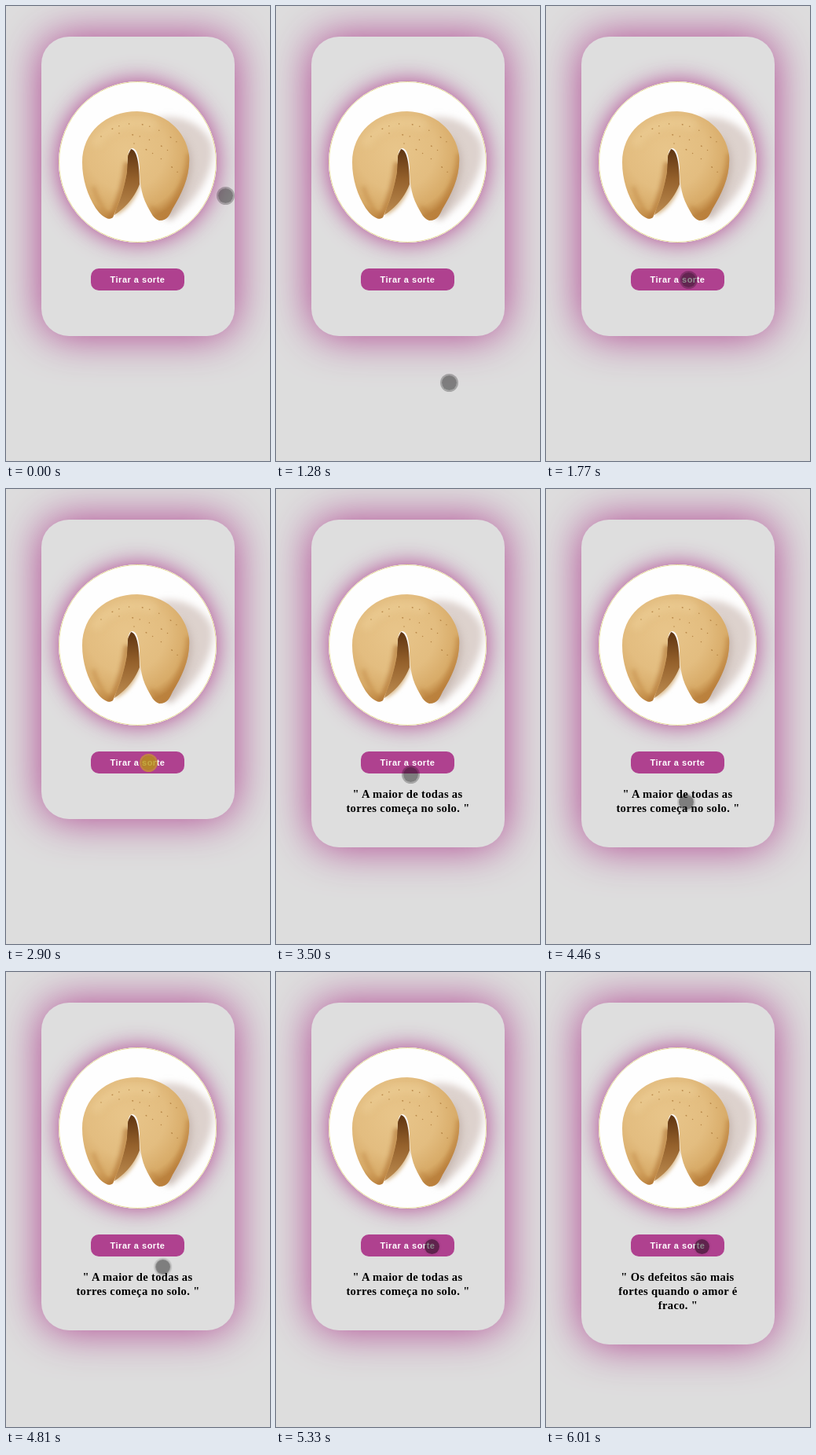
Write an HTML page that moves like this. It is 336x579 px and loops after 8000 ms.

```html
<!DOCTYPE html>
<html lang="pt">
<head>
<meta charset="utf-8">
<title>Biscoito da sorte</title>
<style>
  :root { --pink: #af418f; --loop: 8s infinite; }
  html, body { margin: 0; width: 100%; height: 100%; overflow: hidden; background: #ddd; }
  .stage { position: relative; width: 336px; height: 579px; overflow: hidden; }
  .stage > * { position: absolute; box-sizing: border-box; }

  .card {
    left: 45px; top: 38.5px; width: 246px; height: 381px;
    border-radius: 35px; background: #dedede;
    box-shadow: 0 0 54px var(--pink);
    animation: grow var(--loop) step-end;
  }
  .photo {
    left: 67px; top: 96px; width: 201px; height: 205px;
    border-radius: 50%; overflow: hidden;
    box-shadow: 0 0 30px var(--pink);
  }
  .photo svg { display: block; }
  .button {
    left: 108px; top: 333.5px; width: 119px; height: 28.5px;
    border-radius: 10px; background: var(--pink); color: #fff;
    font: bold 11px/28.5px "Liberation Sans", Arial, sans-serif;
    letter-spacing: .5px; text-align: center;
  }
  .fortune {
    left: 45px; top: 379px; width: 246px; opacity: 0;
    font: bold 14.6px/18px "Liberation Serif", "Times New Roman", serif;
    letter-spacing: .33px; text-align: center; color: #000; white-space: nowrap;
    text-indent: -1px;
  }
  .first { animation: first var(--loop) step-end; }
  .second { animation: second var(--loop) step-end; }

  .cursor {
    left: -11.5px; top: -11.5px; width: 23px; height: 23px;
    border: 2px solid; border-radius: 50%; background-clip: padding-box;
    animation: move var(--loop) linear, show var(--loop) step-end, press var(--loop) step-end;
  }

  @keyframes grow {
    0% { height: 381px; }
    38.75% { height: 417px; }
    75.125%, 100% { height: 435px; }
  }
  @keyframes first {
    0% { opacity: 0; }
    38.75% { opacity: 1; }
    75.125%, 100% { opacity: 0; }
  }
  @keyframes second {
    0% { opacity: 0; }
    75.125%, 100% { opacity: 1; }
  }
  @keyframes show {
    0% { opacity: 1; }
    3.375% { opacity: 0; }
    16%, 100% { opacity: 1; }
  }
  @keyframes press {
    0%, 38.75% { background-color: rgba(0,0,0,.43); border-color: rgba(0,0,0,.25); }
    36.25%, 73.5% { background-color: rgba(182,148,18,.8); border-color: rgba(204,158,36,.7); }
    53.125% { background-color: rgba(0,0,0,.43); border-color: rgba(0,0,0,.12); }
    66.625%, 75.125%, 100% { background-color: rgba(0,0,0,.46); border-color: rgba(0,0,0,.04); }
  }
  @keyframes move {
    0%, .8% { transform: translate(279px, 241px); }
    1.75% { transform: translate(277px, 290px); }
    2.5%, 3.375% { transform: translate(275px, 337px); }
    3.38%, 16.8% { transform: translate(220px, 479px); }
    18.5% { transform: translate(191px, 428px); }
    20.3% { transform: translate(172px, 374px); }
    22.125%, 42% { transform: translate(181px, 348px); }
    43.75%, 44.5% { transform: translate(171px, 363px); }
    46.5% { transform: translate(163px, 425px); }
    48.2% { transform: translate(161px, 459px); }
    50% { transform: translate(165px, 446px); }
    52.25% { transform: translate(170px, 412px); }
    53.125% { transform: translate(172px, 409px); }
    55.75%, 56.5% { transform: translate(178px, 398px); }
    59.5% { transform: translate(198px, 378px); }
    62.625% { transform: translate(204px, 362px); }
    66.625%, 100% { transform: translate(198px, 349px); }
  }
</style>
</head>
<body>
<div class="stage">
  <div class="card"></div>
  <div class="photo">
    <svg width="201" height="205" viewBox="67 96 201 205">
      <defs>
        <filter id="soft" x="-30%" y="-30%" width="160%" height="160%"><feGaussianBlur stdDeviation="5"/></filter>
        <filter id="blur" x="-30%" y="-30%" width="160%" height="160%"><feGaussianBlur stdDeviation="2.5"/></filter>
        <filter id="edge"><feGaussianBlur stdDeviation=".5"/></filter>
        <radialGradient id="dough" gradientUnits="userSpaceOnUse" cx="153" cy="183" r="92">
          <stop offset="0" stop-color="#e8c58a"/>
          <stop offset=".55" stop-color="#e3bd80"/>
          <stop offset=".85" stop-color="#d8ab68"/>
          <stop offset="1" stop-color="#bd8541"/>
        </radialGradient>
        <linearGradient id="fold" x1="0" y1="0" x2="0" y2="1">
          <stop offset="0" stop-color="#5e3411"/>
          <stop offset=".45" stop-color="#94602b"/>
          <stop offset="1" stop-color="#bd8c50"/>
        </linearGradient>
        <clipPath id="shape"><path id="cookie" d="M97 199C97 161 127 134 167 134C202 135 229 158 233 190C235 216 224 238 212 258C208 266 206 273 195 273C188 271 185 264 180 255C171 238 170 220 170 205C169 192 167 182 161 181C154 181 155 197 154 211C150 235 143 253 136 269C130 274 121 267 114 257C104 241 97 221 97 199Z"/></clipPath>
      </defs>
      <rect x="67" y="96" width="201" height="205" fill="#fefefe"/>
      <path d="M182 147C214 132 252 149 262 176C269 207 240 254 207 273L190 250Z" fill="#ddd2cd" filter="url(#soft)"/>
      <path d="M222 165C247 190 238 230 208 271L196 260Z" fill="#b9a8a0" opacity=".65" filter="url(#soft)"/>
      <path d="M138 267C153 261 165 247 171 228L167 215L153 220Z" fill="#d8b98d" filter="url(#blur)"/>
      <path d="M159 182C168 183 170 207 170 227C163 245 151 257 138 266C145 240 154 217 155 190Z" fill="url(#fold)" filter="url(#edge)"/>
      <use href="#cookie" fill="url(#dough)" filter="url(#edge)"/>
      <g clip-path="url(#shape)" fill="none">
        <path d="M234 188C231 226 211 260 199 274" stroke="#b87c38" stroke-width="9" opacity=".45" filter="url(#blur)"/>
        <path d="M154 199C151 232 141 256 132 273" stroke="#a8692a" stroke-width="8" opacity=".55" filter="url(#blur)"/>
        <path d="M111 230C118 251 126 263 134 270M184 254Q191 264 199 267" stroke="#b97e3b" stroke-width="5" opacity=".4" filter="url(#blur)"/>
        <path d="M112 178C126 151 163 142 190 154" stroke="#efd29c" stroke-width="12" opacity=".5" filter="url(#soft)"/>
        <path d="M121 166Q165 129 221 176M144 162Q179 163 209 186M163 175Q198 191 222 215" stroke="#a97534" stroke-width="1.5" stroke-linecap="round" stroke-dasharray="0 17 .6 9 0 13" opacity=".75"/>
      </g>
      <ellipse cx="167.5" cy="198.5" rx="100" ry="102" fill="none" stroke="#e6da91"/>
    </svg>
  </div>
  <div class="button">Tirar a sorte</div>
  <div class="fortune first">" A maior de todas as<br>torres começa no solo. "</div>
  <div class="fortune second">" Os defeitos são mais<br>fortes quando o amor é<br>fraco. "</div>
  <div class="cursor"></div>
</div>
</body>
</html>
```
